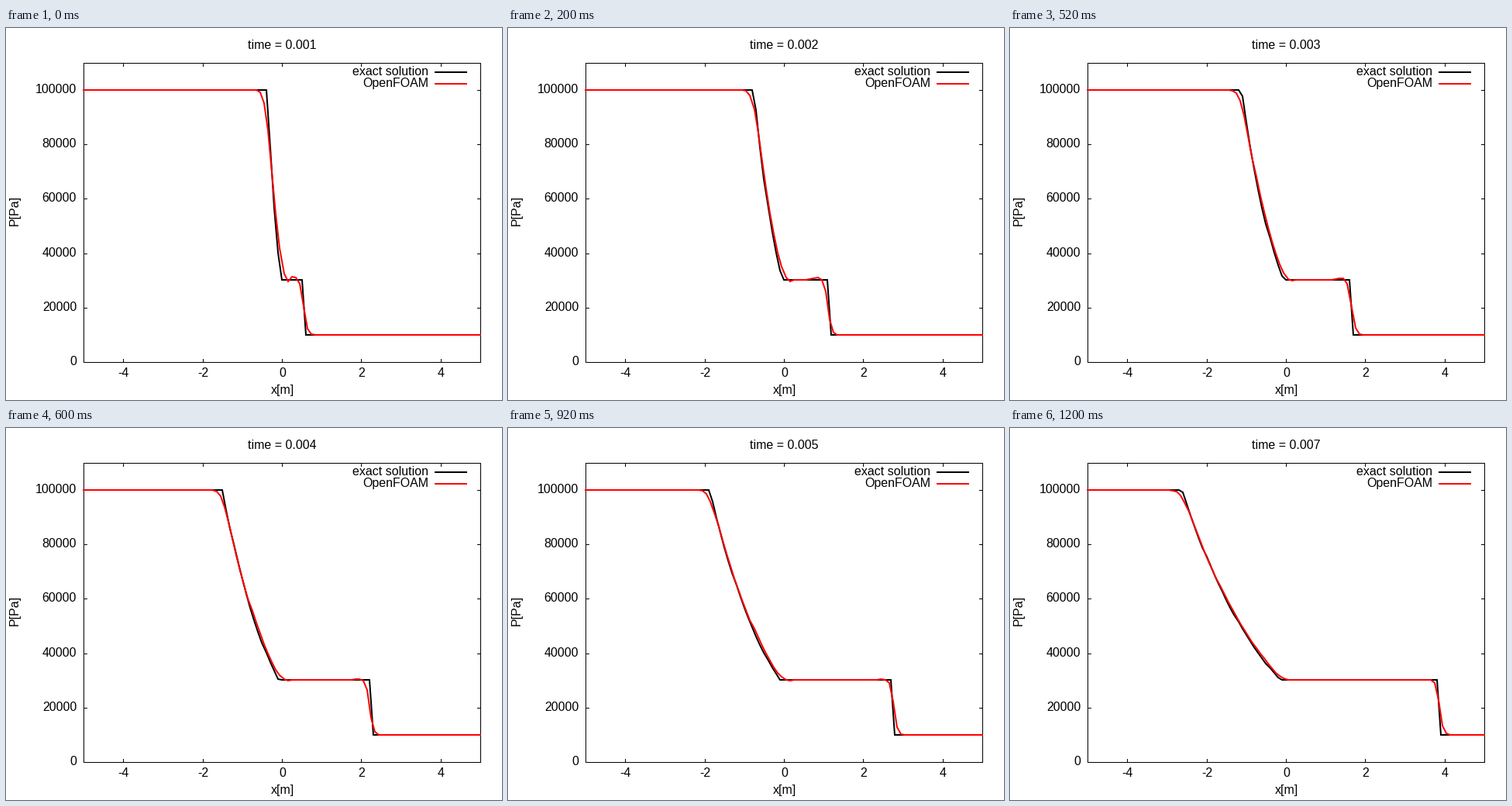
Recreate the animation shown at these times as a matplotlib script. Size 640 by 480 pixels, loop 1400 ms.

```python
import numpy as np
import matplotlib.pyplot as plt
from matplotlib.animation import FuncAnimation

WIDTH, HEIGHT, DPI = 640, 480, 100
PX = 72 / DPI
LEFT, RIGHT, TOP, BOTTOM = 100, 612, 45, 431
STEPS = 7

# Shock tube: air at rest, high pressure on the left
P_LEFT, P_MID, P_RIGHT = 100000, 30313, 10000
C_LEFT = np.sqrt(1.4 * 287 * 348.24)
SHOCK_SPEED = 553.6
TAIL_SPEED = C_LEFT * (5 - 6 * (P_MID / P_LEFT) ** (1 / 7))

nodes = np.linspace(-5, 5, 101)
cells = np.concatenate([[-5], np.linspace(-4.95, 4.95, 100), [5]])


def px(x):
    return np.round(LEFT + (np.asarray(x) + 5) * (RIGHT - LEFT) / 10)


def py(p):
    return np.round(BOTTOM - np.asarray(p) * (BOTTOM - TOP) / 110000)


def fan(x, t):
    """Pressure in the rarefaction fan and the plateau behind it."""
    p = P_LEFT * (5 / 6 - x / (6 * C_LEFT * t)) ** 7
    p = np.where(x < -C_LEFT * t, P_LEFT, p)
    return np.where(x > TAIL_SPEED * t, P_MID, p)


def exact(t):
    return np.where(nodes > SHOCK_SPEED * t, P_RIGHT, fan(nodes, t))


def bump(x, center, width):
    return np.exp(-((x - center) / width) ** 2)


def computed(step, t):
    """Numerical solution: blurred, stretched fan and a smeared shock."""
    head, tail, shock = -C_LEFT * t, TAIL_SPEED * t, SHOCK_SPEED * t
    z = np.linspace(-3, 3, 61)
    weights = np.exp(-z * z / 2)
    x = cells[:, None] + z * (.11 + .005 * step)
    depth = np.clip((x - head) / (tail - head), 0, 1)
    p = fan(x - .05 * (4 * depth - 1) / 3, t) @ weights / weights.sum()
    p -= (P_MID - P_RIGHT) * (1 + np.tanh(11 * (cells - shock))) / 2
    # Start-up ripples that die out
    p -= 2600 / (step + 1) * bump(cells, .1, .08)
    p += 1100 * np.exp(-(step / 2.5) ** 2) * bump(cells, shock - .25, .13)
    return p


plt.rcParams["font.family"] = "Liberation Sans"
fig = plt.figure(figsize=(WIDTH / DPI, HEIGHT / DPI), dpi=DPI, facecolor="white")
ax = fig.add_axes([0, 0, 1, 1])
ax.set(xlim=(0, WIDTH), ylim=(HEIGHT, 0))
ax.axis("off")


def stroke(x, y, color="black", cap="butt", width=2, z=2):
    return ax.plot(x, y, color=color, lw=width * PX, zorder=z, snap=False,
                   solid_capstyle=cap, solid_joinstyle="miter")[0]


def hairline(x, y):
    """One-pixel line through pixel centres."""
    stroke(np.add(x, .5), np.add(y, .5), cap="projecting", width=1)


def label(x, y, text, ha="center", **kw):
    return ax.text(x, y, text, size=16 * PX, ha=ha, va="baseline", **kw)


hairline([LEFT, RIGHT, RIGHT, LEFT, LEFT], [TOP, TOP, BOTTOM, BOTTOM, TOP])
for value in range(-4, 5, 2):
    x = px(value)
    hairline([x, x], [BOTTOM, BOTTOM - 4])
    hairline([x, x], [TOP, TOP + 4])
    label(x + .5, 450, str(value))
for value in range(0, 100001, 20000):
    y = py(value)
    hairline([LEFT, LEFT + 4], [y, y])
    hairline([RIGHT, RIGHT - 4], [y, y])
    label(91, y + 4, str(value), ha="right")

label(356.5, 472, "x[m]")
label(16, 235, "P[Pa]", rotation=90, rotation_mode="anchor")
for y, name, color in [(57, "exact solution", "black"), (72, "OpenFOAM", "red")]:
    label(545, y + 4, name, ha="right")
    stroke([553, 595], [y, y], color)

title = label(356.5, 27, "")
exact_line = stroke([], [], cap="projecting", z=3)
computed_line = stroke([], [], "red", cap="projecting", z=4)


def update(step):
    t = (step + 1) / 1000
    title.set_text(f"time = {t:.3f}")
    exact_line.set_data(px(nodes), py(exact(t)))
    computed_line.set_data(px(cells), py(computed(step, t)))
    return title, exact_line, computed_line


anim = FuncAnimation(fig, update, frames=STEPS, interval=200, repeat=True,
                     repeat_delay=0)
plt.show()
```
